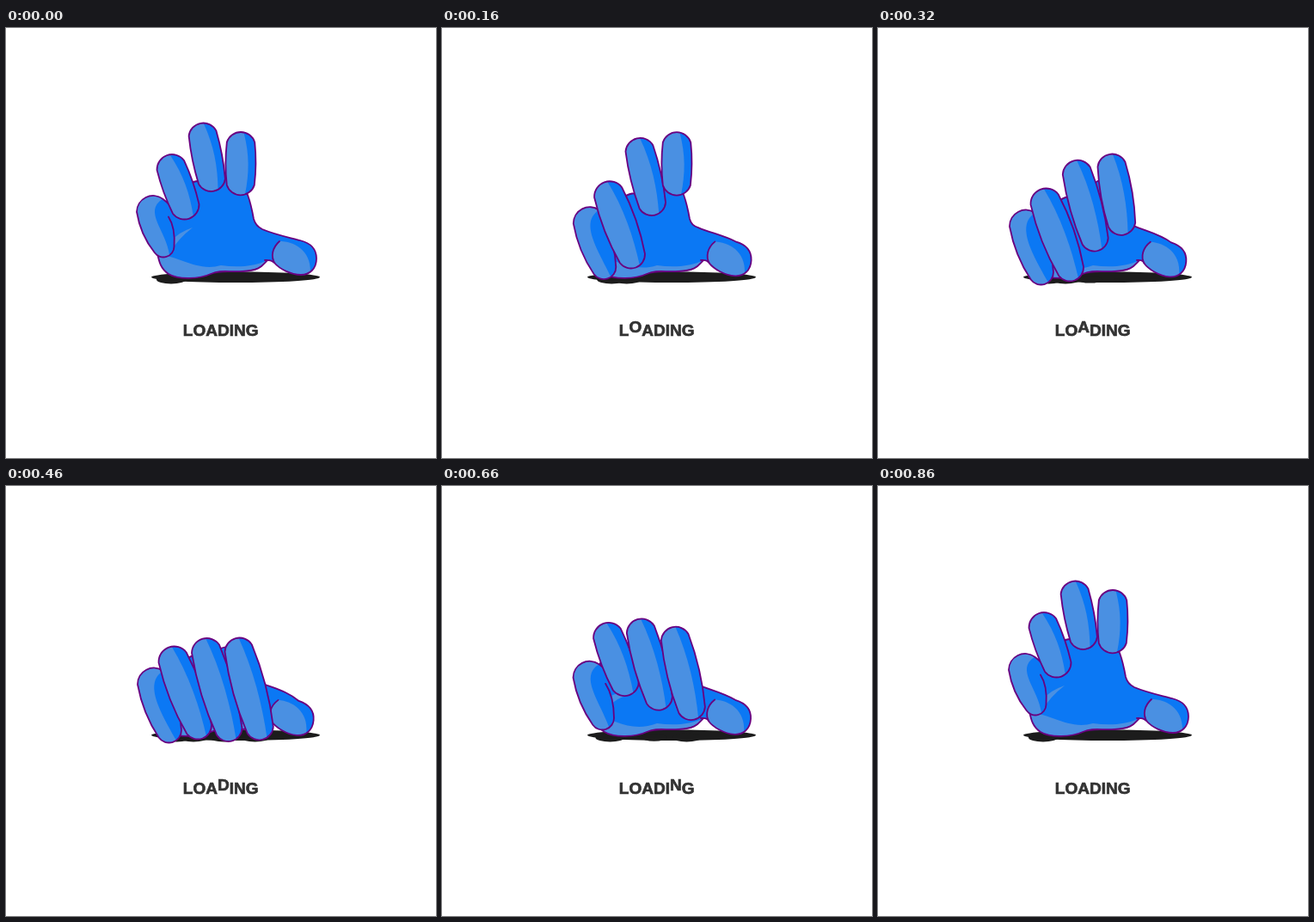
An HTML page for the animation above (0.88 s loop, 500 by 500 pixels).

```html
<!DOCTYPE html>
<html lang="en">
<head>
<meta charset="utf-8">
<title>Loading</title>
<style>
  html, body { margin: 0; width: 100%; height: 100%; overflow: hidden; background: #fff; }
  svg { display: block; width: 500px; height: 500px; }
  .dark { fill: #0b78f4; }
  .light { fill: #4a90e2; }
  .line { fill: none; stroke: #690080; stroke-width: 1.8; stroke-linejoin: round; stroke-linecap: round; }
  #shadow { fill: #1c1c1c; }
  text { font: bold 19px "Liberation Sans", Arial, sans-serif; fill: #333; stroke: #333; stroke-width: .7; }
</style>
</head>
<body>
<svg viewBox="0 0 500 500">
  <g id="shadow"><ellipse cx="267" cy="289.8" rx="98" ry="6.3"/></g>
  <g id="hand"></g>
  <text id="word" x="205.8" y="357.6"></text>
</svg>
<script>
const LOOP = 880, STEP = 20;
const WORD = 'LOADING';

// Each finger: [x, y, r] of tip and base circles when open and closed,
// and its curl over time as [ms, amount].
const fingers = [
  { open: [[171, 214, 19], [183, 254, 12.5]],
    shut: [[172, 230.5, 19], [189.5, 284, 14.5]],
    curl: [[0, 0], [80, .4], [200, 1], [520, 1], [660, .53], [860, 0]] },
  { open: [[193, 164.5, 17.5], [207.5, 205.5, 17]],
    shut: [[195.5, 204.5, 18], [223, 278.5, 16]],
    curl: [[0, 0], [80, .375], [200, 1], [500, 1], [660, .3], [840, 0]] },
  { open: [[229.5, 127.5, 17], [238.5, 173.5, 16.5]],
    shut: [[233.5, 194.5, 17.5], [258.5, 281, 16]],
    curl: [[0, 0], [80, .13], [220, .36], [320, .65], [440, 1], [540, 1], [660, .66], [860, 0]] },
  { open: [[273, 138, 17], [272.8, 177.5, 16.8]],
    shut: [[271.5, 193.5, 17], [294.5, 279, 16.3]],
    curl: [[0, 0], [80, -.02], [220, .02], [320, .46], [440, 1], [560, 1], [660, .77], [860, 0]] }
];
const thumbTurn = [[0, 0], [80, .2], [220, .6], [320, .8], [460, 1], [500, 1], [660, .6], [860, 0]];

const $ = id => document.getElementById(id);
const add = (parent, tag, cls) => {
  const el = document.createElementNS('http://www.w3.org/2000/svg', tag);
  if (cls) el.setAttribute('class', cls);
  return parent.appendChild(el);
};
const layer = () => ['dark', 'light', 'line'].map(c => add($('hand'), 'path', c));
const paint = (paths, shapes) => paths.forEach((p, i) => p.setAttribute('d', shapes[i]));
const mix = (a, b, p) => a + (b - a) * p;

function track(keys, t) {
  const i = keys.findIndex(k => k[0] > t);
  if (i < 0) return keys[keys.length - 1][1];
  const [t0, a] = keys[i - 1], [t1, b] = keys[i];
  return mix(a, b, (t - t0) / (t1 - t0));
}

const palm = layer();
fingers.forEach(f => {
  f.paths = layer();
  f.cast = add($('shadow'), 'ellipse');
});
const letters = [...WORD].map(c => {
  const el = add($('word'), 'tspan');
  el.textContent = c;
  return el;
});

function drawPalm(curls, turn) {
  const a = turn * 5 * Math.PI / 180, cos = Math.cos(a), sin = Math.sin(a);
  const r = (...xy) => {
    let out = '';
    for (let i = 0; i < xy.length; i += 2) {
      const x = xy[i] - 296, y = xy[i + 1] - 232;
      out += ` ${296 + x * cos - y * sin} ${232 - turn + x * sin + y * cos}`;
    }
    return out;
  };
  const k2 = 178 + 18 * curls[1], k3 = 170 + 17 * curls[3];
  const c = curls[2], lift = 4.5 * turn;
  const heel = 'C298 276 296 282 275 283C258 284 250 281 238 286C225 292 200 293 189 286C180 280 178 272 176 262Z';
  const tip = `C${r(331, 287, 318, 280, 312, 273)}`;
  const outline = `M184 206L192 200L212 ${k2 + 4}Q218 ${k2} 224 ${k2}L256 ${k3}L281 194Q285 205 288 222Q290 230 298 ${234 - lift}`
    + `C312 ${240 - lift} 327 ${243 - lift}${r(342, 247)}C${r(354, 250, 361, 257, 361, 268)}C${r(361, 280, 353, 287, 343, 287)}`
    + `${tip}Q308 269 301 270L304 270${heel}`;
  const crease = `M${r(318, 248)}C${r(310, 255, 307, 266, 313, 274)}`;
  const shine = `M178 264C200 ${264 + 14 * c} 222 ${284 + 4 * c} 250 276C270 279 290 277 304 270${heel}`
    + `M${217 + 12 * c} ${232 + 14 * c}Q200 238 193 247L190 262Q200 245 ${217 + 12 * c} ${232 + 14 * c}Z`
    + `M${r(318, 248)}C${r(335, 248, 354, 258, 354, 283)}C${r(351, 286, 347, 287, 343, 287)}${tip}`
    + `C${r(307, 266, 310, 255, 318, 248)}Z`;
  paint(palm, [outline, shine, outline + crease]);
}

function drawFinger(f, p, pinky) {
  const [[ax, ay, ra], [bx, by, rb]] = f.open.map((c, i) => c.map((v, j) => mix(v, f.shut[i][j], p)));
  const len = Math.hypot(bx - ax, by - ay), ux = (bx - ax) / len, uy = (by - ay) / len;
  // s runs along the finger, v across it (positive to the right)
  const at = (s, v) => ` ${ax + ux * s + uy * v} ${ay + uy * s - ux * v}`;
  const top = sweep => `A${ra} ${ra} 0 0 ${sweep}`;
  const end = sweep => `A${rb} ${rb} 0 0 ${sweep}`;
  // the caps stop short of a half circle so that the sides can swell smoothly
  const tipAt = k => at(-.3 * ra, .954 * ra * k), baseAt = k => at(len + .3 * rb, .954 * rb * k);
  const side = (ra + rb) / 2 + (pinky ? 6 : 2 + 4 * p);
  const left = `Q${at(len / 2, -side)}`, right = `Q${at(len / 2, side)}`;
  const body = `M${tipAt(-1)}${top(1)}${tipAt(1)}${right}${baseAt(1)}${end(1)}${baseAt(-1)}${left}${tipAt(-1)}Z`;

  const start = pinky ? at(-ra * .6, ra * .8) : at(-ra * .98, ra * .2);
  const edge = pinky
    ? at(len * .6, rb * mix(.7, -.2, p)) + at(-len * .1, -ra * .6)
    : at(len * .75, rb * .6) + at(len * .25, ra * .6);
  const shine = `M${start}${top(0)}${tipAt(-1)}${left}${baseAt(-1)}${end(0)}${at(len + rb * .95, rb * .312)}C${edge}${start}Z`;

  const line = pinky
    ? `M${at(len * .25, ra * .82)}Q${at(len * .6, side - 2)}${baseAt(1)}${end(1)}${baseAt(-1)}${left}${tipAt(-1)}`
      + `${top(1)}${start}l5 4`
    : body;
  paint(f.paths, [body, shine, line]);

  const low = Math.max(0, Math.min(1, (by + rb - 235) / 30));
  const set = (k, v) => f.cast.setAttribute(k, v);
  set('cx', bx + (pinky ? 9 : -5));
  set('cy', 292.5);
  set('rx', 17 * low);
  set('ry', 5 * low);
}

function draw(t) {
  const curls = fingers.map(f => track(f.curl, t));
  drawPalm(curls, track(thumbTurn, t));
  fingers.forEach((f, i) => drawFinger(f, curls[i], i === 0));
  letters.forEach((el, i) => {
    const d = (t - 80 - i * 116.7) / 120;
    const lift = Math.abs(d) < .5 ? Math.min(4, 6 * Math.cos(Math.PI * d)) : 0;
    el.setAttribute('y', 357.6 - lift);
  });
}

const begin = performance.now();
function tick() {
  const t = (performance.now() - begin) % LOOP;
  draw(Math.floor(t / STEP) * STEP);
  requestAnimationFrame(tick);
}
tick();
</script>
</body>
</html>
```
